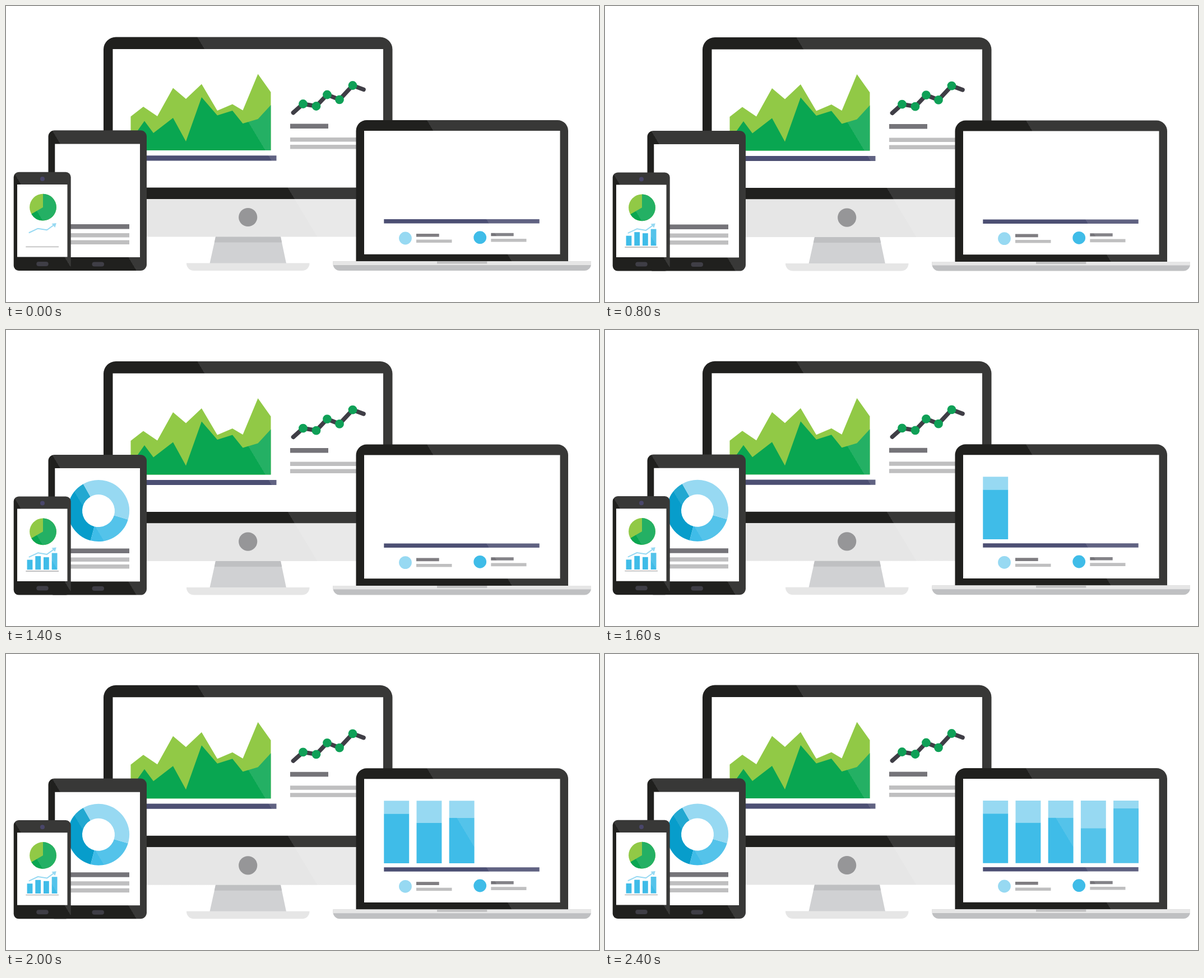
An HTML page with a canvas for the animation above (2.6 s loop, 1058 by 529 pixels).

```html
<!DOCTYPE html>
<html>
<head>
<meta charset="utf-8">
<style>
html, body { margin: 0; width: 100%; height: 100%; overflow: hidden; background: #fff; }
canvas { display: block; }
</style>
</head>
<body>
<canvas id="stage" width="1058" height="529"></canvas>
<script>
const ctx = document.getElementById('stage').getContext('2d');
const STEP = 200, LOOP = 2600;
const BLACK = '#20201e', NAVY = '#4c4f73', GREEN = '#09a651', LIME = '#91c946';
const BLUE = '#3fbce8', SKY = '#97d9f2', DEEP = '#079dcb';
const GREY = '#757479', SILVER = '#bfbfc0', PALE = '#e6e6e6', BUTTON = '#3f3e46';
const RAD = Math.PI / 180;

// Returns a function that lightens a colour right of the slanted line through (x, y).
function gloss(x, y) {
  return color => {
    const light = '#' + color.match(/\w\w/g).map(h =>
      Math.round(parseInt(h, 16) * .89 + 28).toString(16).padStart(2, '0')).join('');
    const g = ctx.createLinearGradient(x - 400, y + 240, x + 400, y - 240);
    g.addColorStop(0, color);
    g.addColorStop(.5, color);
    g.addColorStop(.5, light);
    g.addColorStop(1, light);
    return g;
  };
}

// Box given by its left, top, right and bottom edges.
function box(fill, l, t, r, b, radius = 0) {
  ctx.fillStyle = fill;
  ctx.beginPath();
  ctx.roundRect(l, t, r - l, b - t, radius);
  ctx.fill();
}

function trace(points) {
  ctx.beginPath();
  for (let i = 0; i < points.length; i += 2) ctx.lineTo(points[i], points[i + 1]);
}

function poly(fill, points) {
  trace(points);
  ctx.fillStyle = fill;
  ctx.fill();
}

function line(color, width, points) {
  trace(points);
  ctx.strokeStyle = color;
  ctx.lineWidth = width;
  ctx.lineCap = ctx.lineJoin = 'round';
  ctx.stroke();
}

// Ring sector; an inner radius of 0 gives a pie slice.
function sector(fill, x, y, outer, inner, from, to) {
  ctx.fillStyle = fill;
  ctx.beginPath();
  ctx.arc(x, y, outer, from * RAD, to * RAD);
  ctx.arc(x, y, inner, to * RAD, from * RAD, true);
  ctx.fill();
}

const dot = (fill, x, y, r) => sector(fill, x, y, r, 0, 0, 360);

function monitor() {
  const shine = gloss(341, 55);
  box(shine(BLACK), 174, 55.5, 689.5, 345, [22, 22, 0, 0]);
  box('#fff', 190.5, 77, 673, 324.5);
  box(shine(PALE), 174, 345, 689.5, 412.5);
  dot('#969698', 431.7, 377.5, 16.6);
  poly('#d0d1d3', [374, 412.5, 490, 412.5, 500, 460, 363.5, 460]);
  poly('#bfc0c2', [374, 412.5, 490, 412.5, 492.2, 422.5, 371.8, 422.5]);
  box(PALE, 322, 459.5, 541.5, 473, [0, 0, 13, 13]);

  poly(LIME, [222.5, 197.5, 245, 180, 270, 197, 298, 146.5, 321, 166, 349, 139.5,
    377, 187, 404, 175.5, 422.5, 186.5, 449.5, 121.5, 472.5, 154, 472.5, 258, 222.5, 258]);
  poly(shine(GREEN), [222.5, 240, 247, 205.5, 263, 227, 298, 200, 321, 242, 349, 163,
    377, 195.5, 404, 187, 422.5, 210, 449.5, 202, 472.5, 177, 472.5, 258, 222.5, 258]);
  box(shine(NAVY), 222.5, 267.3, 482.5, 276.5);

  const trend = [512.5, 190.7, 530, 175, 553.5, 179, 573, 158.5, 595, 167.3, 618.5, 142, 638, 149.3];
  line(BUTTON, 7.6, trend);
  for (let i = 2; i < 12; i += 2) dot('#0fa057', trend[i], trend[i + 1], 7.9);
  box(GREY, 507, 210.5, 575, 219);
  box(SILVER, 507, 235, 640, 242.5);
  box(SILVER, 507, 248, 640, 255.5);
}

function tablet(step) {
  const shine = gloss(82, 222);
  box(shine(BLACK), 75.5, 222.3, 251, 473, 11);
  box('#fff', 87.3, 246.5, 239, 449);
  box(BUTTON, 153.5, 457.5, 175, 465.5, 4);
  box(GREY, 95, 390, 220, 398.5);
  box(SILVER, 95, 406, 220, 413.5);
  box(SILVER, 95, 418.5, 220, 426);
  const ring = [[shine(DEEP), 104.7, 240.4], [shine(BLUE), 16.4, 104.7], [SKY, -119.6, 16.4]];
  ring.slice(0, Math.max(0, step - 4)).forEach(([fill, from, to]) =>
    sector(fill, 165, 322.5, 55, 29, from, to));
}

function phone(step) {
  const shine = gloss(14, 298);
  box(shine(BLACK), 13.7, 296.8, 115.7, 473, 9);
  box('#fff', 20, 319, 109.5, 448.5);
  dot('#49466a', 65, 309, 4);
  box(BUTTON, 54.3, 457, 75.7, 465, 4);
  dot(LIME, 66, 359.7, 23.9);
  sector(shine(GREEN), 66, 359.7, 23.9, 0, -90, 150);
  [410, 403.5, 405.5, 398].slice(0, step).forEach((top, i) => {
    const x = 37.6 + i * 14.7;
    box(shine(BLUE), x, top, x + 9.8, 427.7);
  });
  line(SKY, 2, [41.5, 405, 57, 397.7, 73, 400.3, 86, 391]);
  poly(SKY, [81.5, 389, 89.8, 388, 87.5, 396]);
  box(SILVER, 35.3, 429.5, 94, 431.3);
}

function laptop(step) {
  const shine = gloss(751, 204);
  box(shine(BLACK), 624.5, 204, 1003, 456.5, [19, 19, 0, 0]);
  box('#fff', 639, 223, 988.5, 443.7);
  box('#bfc0c2', 583.5, 456.3, 1044, 473, [0, 0, 12, 12]);
  box(PALE, 583.5, 456.3, 1044, 463);
  box(SILVER, 769, 456.3, 858.3, 460.5);

  [285.3, 301.5, 292.5, 311.2, 276].slice(0, Math.max(0, step - 7)).forEach((split, i) => {
    const x = 674.3 + i * 58.2;
    box(SKY, x, 262, x + 44.9, split);
    box(shine(BLUE), x, split, x + 44.9, 373.7);
  });
  box(shine(NAVY), 674.3, 381, 951.7, 388.5);
  dot(SKY, 712.5, 415, 11.4);
  dot(BLUE, 845.7, 413.7, 11.4);
  box('#7f7d81', 732, 407, 772.7, 412.6);
  box(SILVER, 732, 417.5, 795.5, 423);
  box(shine(GREY), 865.3, 405.7, 905.7, 411.2);
  box(SILVER, 865.3, 416, 928.5, 421.6);
}

function frame(now) {
  const step = Math.floor(now % LOOP / STEP);
  const drift = step < 4 || step > 11 ? 0 : step < 8 ? .6 : .3;
  ctx.setTransform(1, 0, 0, 1, 0, 0);
  ctx.fillStyle = '#fff';
  ctx.fillRect(0, 0, 1058, 529);
  ctx.translate(0, drift);
  monitor();
  tablet(step);
  phone(step);
  laptop(step);
  requestAnimationFrame(frame);
}
frame(performance.now());
</script>
</body>
</html>
```
